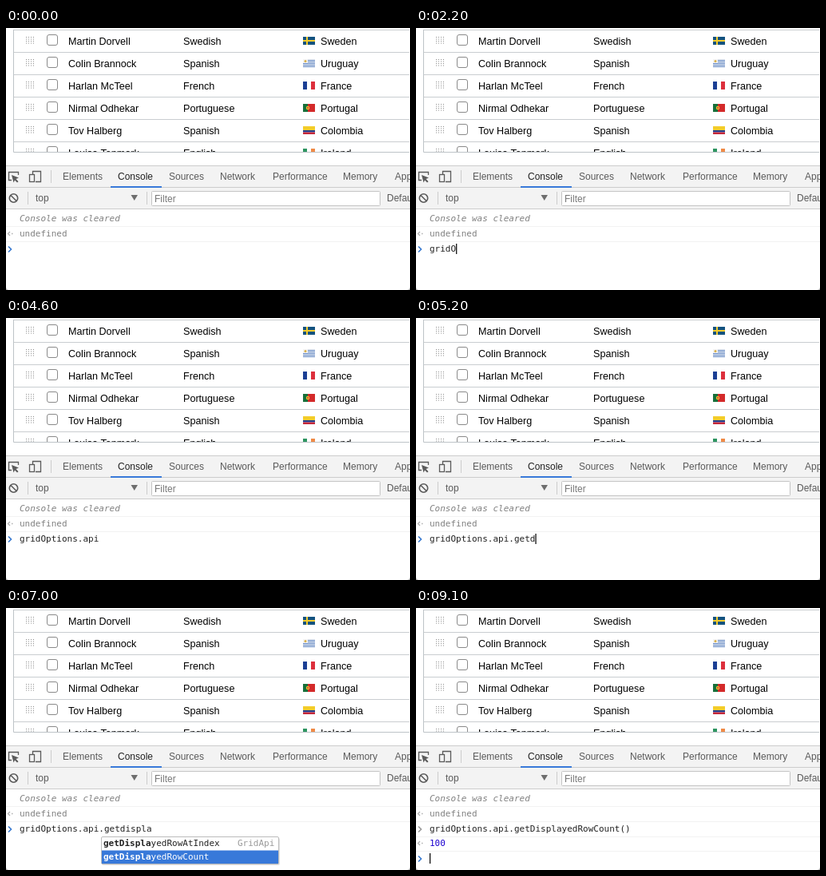
Write an HTML page that moves like this. It is 506 by 328 pixels and loops after 9.2 s.

```html
<!DOCTYPE html>
<html lang="en">
<head>
<meta charset="utf-8">
<title>Grid console</title>
<style>
  html, body { margin: 0; width: 100%; height: 100%; overflow: hidden; background: #fff; }
  svg { display: block; width: 506px; height: 328px; }
  text { white-space: pre; }
  .ui { font: 12px "Liberation Sans", Arial, sans-serif; fill: #5a5a5a; }
  .cell { font: 12.6px "Liberation Sans", Arial, sans-serif; fill: #000; }
  .mono { font: 11px "DejaVu Sans Mono", Menlo, monospace; fill: #222; }
</style>
</head>
<body>
<svg id="stage" viewBox="0 0 506 328" xmlns="http://www.w3.org/2000/svg">
  <defs>
    <clipPath id="view"><rect width="506" height="155"/></clipPath>
  </defs>
  <rect width="506" height="328" fill="#fff"/>
  <g id="grid" clip-path="url(#view)"></g>
  <path d="M9.500 2V155.500H505" fill="none" stroke="#bdc3c7"/>

  <rect y="172" width="506" height="55" fill="#f3f3f3"/>
  <path d="M0 172.500H506M0 199.500H506M0 226.500H506" stroke="#cccccc"/>
  <path d="M56.500 178V194M27.500 205V221M176.500 205V221" stroke="#cccccc"/>
  <rect x="131" y="198" width="64" height="2" fill="#3879d9"/>
  <g id="tabs"></g>

  <g fill="none" stroke="#5a5a5a" stroke-width="1.300">
    <path d="M7 190.500H3.500V180.500H15.500V184"/>
    <path d="M33.500 183V179.500H43.500V192.500H37"/>
    <rect x="29.500" y="183.500" width="6" height="9"/>
    <circle cx="9.500" cy="213" r="5.200" stroke-width="1.600"/>
    <path d="M6 209.500L13 216.500" stroke-width="1.600"/>
  </g>
  <path d="M7 184L16 187.500L12.500 189L15.500 192.200L14 193.500L11 190.400L9.500 193.500Z" fill="#5a5a5a"/>
  <path d="M156.500 209H165L160.750 216Z" fill="#6e6e6e"/>
  <text class="ui" x="37" y="217">top</text>
  <rect x="182.500" y="204.500" width="286" height="18" rx="1" fill="#fff" stroke="#c4c4c4"/>
  <text class="ui" x="186" y="218" style="fill:#777">Filter</text>
  <text class="ui" x="477" y="217">Default levels</text>

  <path d="M0 248.500H506M0 267.500H506" stroke="#f2f2f2"/>
  <text class="mono" x="17" y="242" style="font-style:italic;fill:#808080">Console was cleared</text>
  <text class="mono" x="17" y="261" style="fill:#808080">undefined</text>
  <g fill="none" stroke-width="1.300">
    <path d="M5 255L2.500 257.500L5 260M7 257.500H8.500" stroke="#b0b0b0"/>
    <path id="chevron" d="M3 273.500L6.500 277L3 280.500" stroke-width="1.600"/>
  </g>
  <text id="line" class="mono" x="17" y="280"></text>

  <g id="result">
    <path d="M0 286.500H506M0 304.500H506" stroke="#f2f2f2"/>
    <path d="M5 292L2.500 294.500L5 297M7 294.500H8.500" fill="none" stroke="#b0b0b0" stroke-width="1.300"/>
    <text class="mono" x="17" y="298" style="fill:#1c00cf">100</text>
    <path d="M3 310.500L6.500 314L3 317.500" fill="none" stroke="#3678cf" stroke-width="1.600"/>
  </g>

  <g id="popup">
    <rect x="120" y="288" width="223" height="34" rx="2" fill="#000" opacity=".12"/>
    <rect x="119.500" y="286.500" width="222" height="34" rx="1.500" fill="#fff" stroke="#bcbcbc"/>
    <rect id="pick" x="120" width="221" height="16.500"/>
    <text class="mono" x="122" y="298"><tspan id="head0" font-weight="bold"></tspan><tspan id="tail0"></tspan></text>
    <text class="mono" id="kind" x="290" y="298">GridApi</text>
    <text class="mono" id="row1" x="122" y="315"><tspan id="head1" font-weight="bold"></tspan><tspan id="tail1"></tspan></text>
  </g>

  <rect id="caret" width="1.200" height="13" fill="#000"/>
  <path id="mouse" d="M0 0V13.200L3.100 10.400L5.300 15.600L7.700 14.600L5.500 9.500H9.500Z" fill="#000" stroke="#fff"/>
  <path d="M0 324Q0 328 4 328H0ZM506 324Q506 328 502 328H506Z" fill="#b5b5b5"/>
</svg>

<script>
const $ = id => document.getElementById(id);
const LOOP = 9200;
const CHAR = 6.622;

// Table
const rect = (x, y, w, h, fill) => `<rect x="${x}" y="${y}" width="${w}" height="${h}" fill="${fill}"/>`;
const bars = (...c) => c.map((f, i) => rect(i * 5, 0, 5, 10, f)).join("");
const flags = {
  Sweden: rect(0, 0, 15, 10, "#14527f") + rect(4, 0, 2, 10, "#f2cc30") + rect(0, 4, 15, 2, "#f2cc30"),
  Uruguay: rect(0, 0, 15, 10, "#f4f4f4") + [1, 3, 5, 7, 9].map(y => rect(0, y, 15, 1, "#5c84c4")).join("") +
    rect(0, 0, 6, 5, "#f4f4f4") + '<circle cx="3" cy="2.500" r="1.500" fill="#d8b04a"/>',
  France: bars("#1c3f94", "#ffffff", "#dc2f3c"),
  Portugal: rect(0, 0, 6, 10, "#17703a") + rect(6, 0, 9, 10, "#d42a2a") +
    '<circle cx="6" cy="5" r="2.200" fill="#ecc735"/><circle cx="6" cy="5" r="1" fill="#d42a2a"/>',
  Colombia: rect(0, 0, 15, 5, "#f4cd2a") + rect(0, 5, 15, 2.5, "#243f8f") + rect(0, 7.5, 15, 2.5, "#c5283a"),
  Ireland: bars("#2c9460", "#ffffff", "#f08a45")
};
const people = [
  ["Martin Dorvell", "Swedish", "Sweden"],
  ["Colin Brannock", "Spanish", "Uruguay"],
  ["Harlan McTeel", "French", "France"],
  ["Nirmal Odhekar", "Portuguese", "Portugal"],
  ["Tov Halberg", "Spanish", "Colombia"],
  ["Louisa Tenmark", "English", "Ireland"]
];
const cell = (x, s) => `<text class="cell" x="${x}" y="19">${s}</text>`;
let dots = "";
for (let i = 0; i < 16; i++) dots += rect(25 + i % 4 * 3, 9 + (i >> 2) * 2.5, 1, 1, "#8c8c8c");

$("grid").innerHTML = people.map(([name, tongue, land], i) =>
  `<g transform="translate(0 ${2 + i * 28})">
    <path d="M9 .5H505" stroke="#c9cdd0"/>${dots}
    <rect x="51.5" y="6.500" width="13" height="13" rx="2.500" fill="#fff" stroke="#8a8a8a"/>
    ${cell(78, name)}${cell(222, tongue)}${cell(394, land)}
    <g transform="translate(372 9)">${flags[land]}</g>
  </g>`).join("");

const tabs = { Elements: 71, Console: 140, Sources: 204, Network: 268, Performance: 334, Memory: 422, Application: 487 };
$("tabs").innerHTML = Object.entries(tabs).map(([s, x]) =>
  `<text class="ui" x="${x}" y="190"${s === "Console" ? ' style="fill:#222"' : ""}>${s}</text>`).join("");

// Typing
const FOCUS = 1100, TYPE = 1800, DOWN = 6500, PICK = 7300, ENTER = 8100;
const BASE = "gridOptions.api.";
const options = ["getDisplayedRowAtIndex", "getDisplayedRowCount"];
const keys = [];
const type = (s, times) => [...s].forEach((c, i) => keys.push([times[i], c]));
type("gridOptions", Array.from({ length: 11 }, (_, i) => TYPE + i * 100));
type(".api", [3600, 3700, 3800, 4000]);
type(".getdispla", [4700, 4800, 4900, 5000, 5200, 5400, 5700, 5900, 6100, 6300]);
const tail = [[7500, "("], [7700, ")"]];
const beats = [FOCUS, ...keys.map(k => k[0]), DOWN, PICK, ...tail.map(k => k[0]), ENTER];
const typed = (list, t) => list.filter(k => k[0] <= t).map(k => k[1]).join("");

const show = (id, on) => $(id).setAttribute("visibility", on ? "visible" : "hidden");

function drawPopup(word, t) {
  const on = word.length >= 5 && t < PICK;
  show("popup", on);
  if (!on) return;
  options.forEach((s, i) => {
    $("head" + i).textContent = s.slice(0, word.length);
    $("tail" + i).textContent = s.slice(word.length);
  });
  const second = t >= DOWN;
  $("pick").setAttribute("y", second ? 303.5 : 287);
  $("pick").setAttribute("fill", second ? "#3879d9" : "#cdcdcd");
  $("row1").style.fill = second ? "#fff" : "#222";
  $("kind").style.fill = second ? "#999" : "#555";
}

function drawMouse(t) {
  show("mouse", t >= 100 && t < TYPE);
  const p = Math.min(1, Math.max(0, (t - 100) / 900));
  const e = 1 - (1 - p) ** 3;
  $("mouse").setAttribute("transform", `translate(${510 - 309 * e} ${190 + 96 * e})`);
}

function draw(ms) {
  const t = Math.floor(ms % LOOP / 100) * 100;
  const text = t < PICK ? typed(keys, t) : BASE + options[1] + typed(tail, t);
  const done = t >= ENTER;
  $("line").textContent = text;
  $("chevron").setAttribute("stroke", done ? "#999" : "#3678cf");
  show("result", done);
  drawPopup(text.slice(BASE.length), t);
  drawMouse(t);

  const last = beats.filter(b => b <= t).pop();
  show("caret", t >= FOCUS && (t - last) % 1000 < 500);
  $("caret").setAttribute("x", 17 + (done ? 0 : text.length * CHAR));
  $("caret").setAttribute("y", done ? 307 : 270);
}

const start = performance.now();
function tick() {
  draw(performance.now() - start);
  requestAnimationFrame(tick);
}
tick();
</script>
</body>
</html>
```
